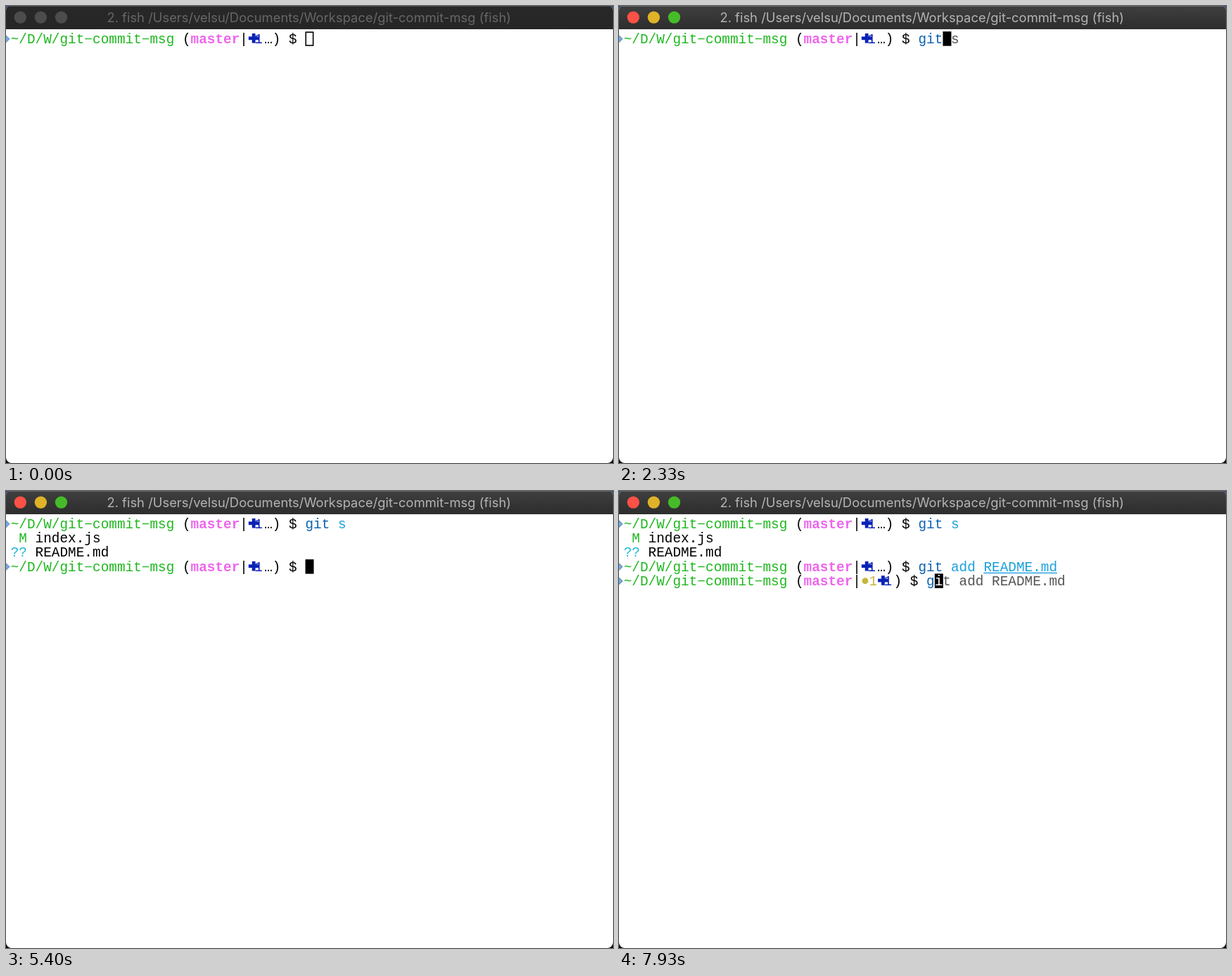
An HTML page with a canvas for the animation above (8 s loop, 863 by 649 pixels).

```html
<!DOCTYPE html>
<html lang="en">
<head>
<meta charset="utf-8">
<title>Terminal session</title>
<style>
  html, body { margin: 0; width: 100%; height: 100%; overflow: hidden; background: #000; }
  canvas { display: block; }
</style>
</head>
<body>
<canvas id="stage" width="863" height="649"></canvas>
<script>
const ctx = document.getElementById('stage').getContext('2d');
const W = 863, H = 649, LOOP = 8000;
const CELL = 11.63, LEFT = 6.7, TOP = 36.2, LINE = 20.3;
const MONO = '19.38px "Liberation Mono", monospace';
const TITLE = '18.4px Inter, sans-serif';
const color = {
  path: '#1eb81e', branch: '#ee66ee', plus: '#0a22b6', staged: '#c6b53a', text: '#000',
  command: '#0a62b2', argument: '#1ba0dc', ghost: '#555', unknown: '#1cb8d2'
};

// Times of the main events, in ms
const ACTIVE = 925, RUN_STATUS = 2795, SECOND_PROMPT = 3260, RUN_ADD = 7195, THIRD_PROMPT = 7525;

// Each key: [time, number of typed characters, suggested full line]
const STATUS = 'git s', PATCH = 'git add -p README.md', ADD = 'git add README.md';
const statusKeys = [[2060, 1, STATUS], [2195, 2, STATUS], [2265, 3, STATUS], [2395, 4, STATUS], [2665, 5, STATUS]];
const addKeys = [
  [5460, 1, STATUS], [5595, 2, STATUS], [5660, 3, STATUS], [5730, 4, STATUS],
  [5860, 5, PATCH], [5930, 6, PATCH], [5995, 7, PATCH], [6065, 8, PATCH],
  [6460, 9, ADD], [6595, 10, ADD], [6795, 17, ADD]
];
const lastKeys = [[7865, 1, ADD]];

// Pointer positions: [time, x, y]
const entering = [[400, 640, 0], [600, 520, 110], [865, 386, 224], [930, 384, 224]];
const resting = [[3260, 382, 251], [3530, 378, 243], [3730, 377, 235], [4400, 378, 239], [5200, 377, 235]];

const latest = (keys, t) => keys.filter(key => key[0] <= t).pop();
const colX = col => LEFT + col * CELL;
const rowY = row => TOP + row * LINE;

function along(points, t) {
  const next = points.findIndex(p => p[0] > t);
  if (next < 0) return points[points.length - 1].slice(1);
  if (next === 0) return points[0].slice(1);
  const [t0, x0, y0] = points[next - 1], [t1, x1, y1] = points[next];
  const k = (t - t0) / (t1 - t0), ease = k * k * (3 - 2 * k);
  return [x0 + (x1 - x0) * ease, y0 + (y1 - y0) * ease];
}

function write(string, col, row, fill, bold = false) {
  ctx.font = (bold ? 'bold ' : '') + MONO;
  ctx.textAlign = 'left';
  ctx.fillStyle = fill;
  [...string.replaceAll('-', '\u2212')].forEach((char, i) => ctx.fillText(char, colX(col + i), rowY(row) + 16.4));
}

function polygon(points) {
  ctx.beginPath();
  points.forEach(([x, y]) => ctx.lineTo(x, y));
  ctx.closePath();
}

function disc(x, y, radius, fill) {
  ctx.fillStyle = fill;
  ctx.beginPath();
  ctx.arc(x, y, radius, 0, Math.PI * 2);
  ctx.fill();
}

function changedMark(col, row) {
  const x = colX(col) + 8.2, y = rowY(row) + 9.6;
  write('1', col + 0.8, row, color.plus);
  ctx.fillStyle = color.plus;
  ctx.fillRect(x - 7.3, y - 2.4, 14.6, 4.8);
  ctx.fillRect(x - 2.4, y - 6.8, 4.8, 13.6);
}

function prompt(row, staged = false) {
  const y = rowY(row) + 10.5;
  polygon([[-1, y - 6], [5, y], [-1, y + 6]]);
  ctx.fillStyle = '#69aeea';
  ctx.fill();
  ctx.strokeStyle = '#567';
  ctx.lineWidth = 0.8;
  ctx.stroke();
  write('~/D/W/git-commit-msg', 0, row, color.path);
  write('(', 21, row, color.text);
  write('master', 22, row, color.branch, true);
  write('|', 28, row, color.text);
  if (staged) {
    disc(colX(29) + 6, rowY(row) + 10.3, 4.4, color.staged);
    write('1', 30, row, color.staged);
    changedMark(31, row);
    write(') $', 33, row, color.text);
  } else {
    changedMark(29, row);
    write('…) $', 31, row, color.text);
  }
}

function cursor(col, row, char = '', hollow = false) {
  const x = colX(col), y = rowY(row);
  if (hollow) {
    ctx.strokeStyle = '#000';
    ctx.lineWidth = 1.6;
    ctx.strokeRect(x + 0.9, y + 1, 10.4, 18.8);
  } else {
    ctx.fillStyle = '#000';
    ctx.fillRect(x + 0.2, y, 12, 20.5);
    write(char, col, row, '#fff');
  }
}

function commandLine(col, row, typed) {
  write(typed.slice(0, 3), col, row, color.command);
  write(typed.slice(3), col + 3, row, color.argument);
  const fileLength = typed.length - 8;
  if (fileLength > 0) {
    ctx.fillStyle = color.argument;
    ctx.fillRect(colX(col + 8), rowY(row) + 18.6, fileLength * CELL, 1.4);
  }
}

function editing(col, row, keys, t, hollow = false) {
  const [, count, line] = latest(keys, t) || [0, 0, ''];
  commandLine(col, row, line.slice(0, count));
  write(line.slice(count), col + count, row, color.ghost);
  cursor(col + count, row, line.charAt(count), hollow);
}

function titleBar(active, program) {
  const shade = ctx.createLinearGradient(0, 0, 0, 33);
  shade.addColorStop(0, active ? '#3f3f3f' : '#282828');
  shade.addColorStop(1, active ? '#2d2d2d' : '#262626');
  ctx.fillStyle = shade;
  ctx.fillRect(0, 0, W, 33);
  ctx.fillStyle = active ? '#646464' : '#454545';
  ctx.fillRect(0, 0, W, 1);
  ['#fc5146', '#dfb327', '#46bb29'].forEach((fill, i) => disc(20.3 + i * 29.1, 16.1, 8.7, active ? fill : '#4c4c4c'));
  ctx.font = TITLE;
  ctx.textAlign = 'center';
  ctx.fillStyle = active ? '#b3b3b3' : '#666';
  ctx.fillText(`2. ${program} /Users/velsu/Documents/Workspace/git-commit-msg (fish)`, 430.7, 23.4);
}

function beam(x, y) {
  ctx.beginPath();
  for (const side of [-1, 1]) {
    ctx.moveTo(x + side * 4.5, y - 11.3);
    ctx.quadraticCurveTo(x, y - 11, x, y - 6);
    ctx.lineTo(x, y + 6);
    ctx.quadraticCurveTo(x, y + 11, x + side * 4.5, y + 11.3);
  }
  ctx.moveTo(x - 2.5, y + 1);
  ctx.lineTo(x + 2.5, y + 1);
  ctx.strokeStyle = '#000';
  ctx.lineWidth = 1.7;
  ctx.stroke();
}

function arrow(x, y) {
  ctx.save();
  ctx.translate(x, y);
  polygon([[0.7, 0], [0.7, 18.5], [4.9, 14.7], [8.2, 22.3], [11.3, 21], [8.1, 13.7], [13.6, 13.3]]);
  ctx.shadowColor = 'rgba(0,0,0,.4)';
  ctx.shadowBlur = 4;
  ctx.shadowOffsetY = 2;
  ctx.strokeStyle = '#fff';
  ctx.lineWidth = 2.4;
  ctx.stroke();
  ctx.shadowColor = 'transparent';
  ctx.fillStyle = '#000';
  ctx.fill();
  ctx.restore();
}

function pointer(t) {
  if (t >= entering[0][0] && t < ACTIVE) arrow(...along(entering, t));
  else if (t >= ACTIVE && t < statusKeys[0][0]) beam(384, 224.5);
  else if (t >= SECOND_PROMPT && t < 5265) arrow(...along(resting, t));
}

function terminal(t) {
  prompt(0);
  if (t < RUN_STATUS) return editing(36, 0, statusKeys, t, t < ACTIVE);
  commandLine(36, 0, STATUS);
  write('M', 1, 1, color.path);
  write('index.js', 3, 1, color.text);
  write('??', 0, 2, color.unknown);
  write('README.md', 3, 2, color.text);
  if (t < SECOND_PROMPT) return cursor(0, 3);
  prompt(3);
  if (t < RUN_ADD) return editing(36, 3, addKeys, t);
  commandLine(36, 3, ADD);
  if (t < THIRD_PROMPT) return cursor(0, 4);
  prompt(4, true);
  editing(37, 4, lastKeys, t);
}

function draw(t) {
  const running = (t >= RUN_STATUS && t < SECOND_PROMPT) || (t >= RUN_ADD && t < THIRD_PROMPT);
  ctx.fillStyle = '#000';
  ctx.fillRect(0, 0, W, H);
  ctx.fillStyle = '#31517c';
  ctx.fillRect(0, 0, W, 10);
  ctx.save();
  ctx.beginPath();
  ctx.roundRect(0, 0, W, H, [6, 6, 8, 8]);
  ctx.clip();
  ctx.fillStyle = '#fff';
  ctx.fillRect(0, 0, W, H);
  titleBar(t >= ACTIVE, running ? 'git' : 'fish');
  terminal(t);
  pointer(t);
  ctx.restore();
}

const start = performance.now();
function tick() {
  draw((performance.now() - start) % LOOP);
  requestAnimationFrame(tick);
}
tick();
</script>
</body>
</html>
```
